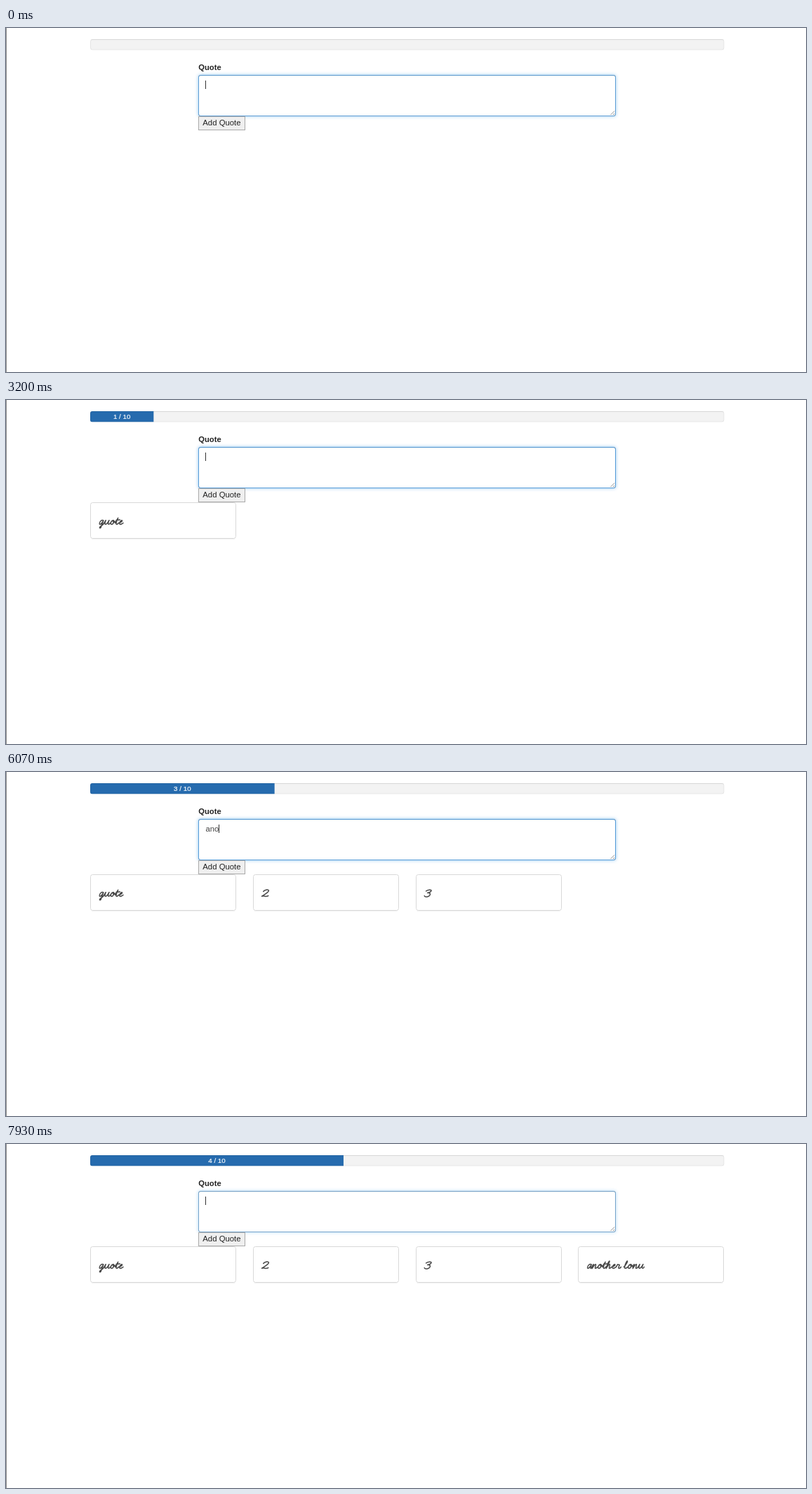
Recreate the animation shown at these times as an HTML page. Size 1140 px wide and 491 px high, loop 8000 ms.

```html
<!DOCTYPE html>
<html lang="en">
<head>
<meta charset="utf-8">
<title>Quote form</title>
<style>
  html, body { margin: 0; width: 100%; height: 100%; overflow: hidden; background: #fff; }
  svg { display: block; font-family: "Liberation Sans", Arial, sans-serif; font-size: 11.2px; fill: #222; }
  .box { fill: #fff; stroke: #b3b3b3; }
  .card rect { fill: #fff; stroke: #d9d9d9; }
  .script { fill: none; stroke: #484848; stroke-width: 1.55; stroke-linecap: round; stroke-linejoin: round; }
  .count { font-size: 9.8px; fill: #fff; stroke: #fff; stroke-width: .2; text-anchor: middle; }
</style>
</head>
<body>
<svg id="stage" width="1140" height="491" viewBox="0 0 1140 491">
  <defs>
    <filter id="blur" x="-5%" y="-40%" width="110%" height="180%"><feGaussianBlur stdDeviation="2.8"/></filter>
    <clipPath id="track"><rect x="120" y="16" width="903.5" height="15.5" rx="3"/></clipPath>
  </defs>
  <rect width="1140" height="491" fill="#fff"/>
  <path d="M.5 0V491" stroke="#8c8c8c"/>
  <g clip-path="url(#track)">
    <rect x="120" y="16" width="903.5" height="15.5" fill="#f3f3f3"/>
    <path d="M120 16.5H1024" stroke="#e4e4e4"/>
    <rect id="bar" x="120" y="16" height="15.5" fill="#266bae"/>
  </g>
  <rect x="120.5" y="16.5" width="902.5" height="14.5" rx="3" fill="none" stroke="#000" stroke-opacity=".06"/>
  <text id="count" class="count" y="27"></text>

  <text x="274.3" y="59.5" font-weight="bold">Quote</text>
  <rect id="glow" x="274" y="67" width="595" height="59" rx="3" fill="#66afe9" fill-opacity=".75" filter="url(#blur)"/>
  <rect class="box" x="274.5" y="67.5" width="594" height="58" rx="2.5"/>
  <path d="M276 68.5H867" stroke="#000" stroke-opacity=".06"/>
  <rect id="ring" x="274.5" y="67.5" width="594" height="58" rx="2.5" fill="none" stroke="#559cd8"/>
  <path d="M861.5 124L867 118.5M865 124L867 122" stroke="#777" stroke-width=".8"/>
  <text id="typed" x="284.5" y="84.5" fill="#444" xml:space="preserve"></text>
  <path id="spelling" stroke="#e0413b" stroke-width="1.5" stroke-dasharray="1.5 .9"/>
  <path id="caret" stroke="#333"/>

  <rect x="274.5" y="126.5" width="66" height="19" fill="#efefef" stroke="#a9a9a9"/>
  <text x="280.3" y="139.3" font-size="11.35">Add Quote</text>
  <g id="cards"></g>
  <g id="beam" fill="none" stroke-linecap="round">
    <path id="beamShape" stroke="#fff" stroke-width="2.6" d="M-3-6Q0-6 0-4.5V4.5Q0 6-3 6M3-6Q0-6 0-4.5M0 4.5Q0 6 3 6M-1.5 1.8H1.5"/>
    <use href="#beamShape" style="stroke:#222"/>
  </g>
  <path id="hand" fill="#fff" stroke="#111" stroke-width="1.1" stroke-linejoin="round"
    d="M-3.5-6.5C-2.3-7.4-1.3-6.3-.8-5L.3-2.5C1-3.4 2.4-3.2 2.8-2.3C3.6-3 5-2.7 5.2-1.7C6.5-2.2 8-1 8.8.8C9.8 3 9.5 5 8.6 7H2.5C1 5-1.5 3.5-3 1.5C-3.8.2-2.3-.6-1.2.3L-.6.8L-3.8-4.5C-4.2-5.4-4.1-6.1-3.5-6.5Z"/>
</svg>
<script>
const LOOP = 8000, FPS = 15, GOAL = 10, TRACK = 903.5;
const $ = id => document.getElementById(id);
const set = (el, attrs) => { for (const k in attrs) el.setAttribute(k, attrs[k]); };
const show = (el, on) => set(el, { visibility: on ? 'visible' : 'hidden' });

// Typing runs from..to; the pointer hides until `awake`; the quote is added at `add`.
const quotes = [
  { text: 'quote', from: 670, to: 1270, awake: 1730, add: 2300 },
  { text: '2', from: 3930, to: 3930, awake: 4060, add: 4500 },
  { text: '3', from: 5130, to: 5130, awake: 5270, add: 5690 },
  { text: 'another lonu', from: 5960, to: 6540, awake: 6660, add: 7393, misspelt: 8 }
];
const focusSpans = [[-90, 2150], [3070, 4370], [4730, 5600], [5830, 7280], [7880, 9000]];
const pointerPath = [
  [0, 369, 94], [1270, 369, 94], [1730, 372, 95.5], [1800, 372, 95.5], [2130, 325, 134],
  [2470, 324, 135], [2670, 324, 135], [3060, 324, 87], [4000, 324, 87], [4300, 322, 134],
  [4430, 322, 135], [4530, 320, 119], [4700, 322, 93], [5240, 322, 95], [5400, 321, 116],
  [5530, 322, 135], [5690, 322, 135], [5830, 323, 92], [6730, 324, 92], [6930, 324, 94],
  [7200, 328, 135], [7450, 328, 135], [7850, 333, 91], [8000, 333, 91]
];

// Pen strokes of the script lettering: [path, advance].
const bowl = 'M6.8-6C4.5-7.6 .8-4 1.2-1.3C1.8 .8 5-2 6.8-6';
const arch = 'L.3-.3C1.8-3.2 4.5-6.8 5.6-6C6.2-5.2 3.8-1.2 4.8-.5C5.8-.3 7.2-1.6 8-2.5';
const glyphs = {
  a: [bowl + 'C5.6-3 5-.6 6-.4C6.6-.4 7.2-1.5 7.5-2.5', 7.5],
  q: [bowl + 'L3.2 3.8C2.5 5.3 1 5 1.6 3.6C2.5 2 6 1 8-2.5', 8],
  u: ['M0-2.5L2.2-6.3C1.2-4 .2-.7 1.8-.5C3.5-.3 5.5-3.5 7-6.3C5.8-4 5-.8 6.2-.5C7.2-.4 8-1.5 8.5-2.5', 8.5],
  o: ['M4.8-6.2C2-6.5 0-2.5 1-.9C2.2 .6 5.8-2.2 5.4-5C5.2-6.8 3.5-5.6 4.2-4.2C5-3 6.2-3.8 7-4.6', 7],
  t: ['M0-2.5L4.2-9.6C2.6-6.5 .6-1.2 2-.5C3-.3 4.3-1.6 5-2.5M1.6-6.6L6.8-7.1', 5],
  e: ['M.8-2.8C3-3 5.6-4.8 5-6C4-7 1-4 1.2-1.6C1.5 .2 4.5-.5 6.5-2.5', 6.5],
  n: ['M0-2.5L2.2-6.3' + arch, 8],
  h: ['M0-2.5C2.5-4.5 6-10.5 5-11C3.8-11.3 1.5-4.5 .3-.3' + arch, 8],
  r: ['M0-2.5L2.2-6.2C3-5.2 4.4-6.2 4.8-5.6C4.8-4.4 2.6-1 3.8-.5C5-.3 6.5-1.6 7-2.5', 7],
  l: ['M0-2.5C2.5-4.5 6-10.5 5-11C3.5-11-.2-.9 1.7-.5C3-.3 4.7-1.6 5.5-2.5', 5.5],
  2: ['M3-7.5C4.5-9.6 9.5-11 10.6-8.8C11-6 3-2.5 .8-.6C3.5-2 6.5 .8 10-1.3', 11],
  3: ['M3-8C5-10 11-10.6 10.4-8.4C9.8-6.6 7-5.8 5-5.6C8-6 9.6-4.5 8.5-2.4C6.8 .6 1.5 1 .6-1.2', 11],
  ' ': ['', 4]
};

function lettering(text, x, y) {
  return [...text].map(ch => {
    const [d, advance] = glyphs[ch];
    const stroke = `<path transform="translate(${x} ${y})" d="${d}"/>`;
    x += advance;
    return d && stroke;
  }).join('');
}

$('cards').innerHTML = quotes.map(({ text }, i) => {
  const x = 120 + i * 231.8;
  return `<g class="card" role="img" aria-label="${text}">
    <path d="M${x + 2} 198.5h204" stroke="#000" stroke-opacity=".06"/>
    <rect x="${Math.round(x) + .5}" y="146.5" width="207" height="51" rx="3"/>
    <g class="script">${lettering(text, x + 12, 178)}</g></g>`;
}).join('');
const cards = [...$('cards').children];

const clamp = v => Math.min(1, Math.max(0, v));

// CSS "ease": cubic-bezier(.25, .1, .25, 1)
function ease(p) {
  p = clamp(p);
  const bezier = (s, a, b) => 3 * a * s * (1 - s) ** 2 + 3 * b * s * s * (1 - s) + s ** 3;
  let lo = 0, hi = 1;
  for (let i = 0; i < 24; i++) {
    const mid = (lo + hi) / 2;
    if (bezier(mid, .25, .25) < p) lo = mid; else hi = mid;
  }
  return bezier(lo, .1, 1);
}

function pointerAt(t) {
  const i = Math.max(1, pointerPath.findIndex(k => k[0] >= t));
  const [t0, x0, y0] = pointerPath[i - 1], [t1, x1, y1] = pointerPath[i];
  const p = clamp((t - t0) / (t1 - t0)), s = p * p * (3 - 2 * p);
  return [x0 + (x1 - x0) * s, y0 + (y1 - y0) * s];
}

function drawProgress(t) {
  const done = quotes.filter(q => t >= q.add).length;
  const width = TRACK / GOAL * quotes.reduce((sum, q) => sum + ease((t - q.add) / 600), 0);
  set($('bar'), { width });
  $('count').textContent = done ? `${done} / ${GOAL}` : '';
  set($('count'), { x: 120 + width / 2 });
  cards.forEach((card, i) => show(card, i < done));
}

function drawField(t) {
  const focused = focusSpans.some(([a, b]) => t >= a && t < b);
  const level = focusSpans.reduce((sum, [a, b]) => sum + ease((t - a) / 150) - ease((t - b) / 150), 0);
  set($('glow'), { opacity: level });
  set($('ring'), { opacity: level });

  const q = quotes.find(q => t >= q.from && t < q.add);
  const typed = $('typed');
  const share = q ? (q.to > q.from ? clamp((t - q.from) / (q.to - q.from)) : 1) : 0;
  typed.textContent = q ? q.text.slice(0, 1 + Math.floor(share * (q.text.length - 1))) : '';
  const end = 284.5 + (q ? typed.getComputedTextLength() : 0);
  set($('caret'), { d: `M${Math.floor(end) + .5} 75V87` });
  show($('caret'), focused);

  const marked = q && q.misspelt && t >= q.awake;
  show($('spelling'), marked);
  if (marked) set($('spelling'), { d: `M${284.5 + typed.getSubStringLength(0, q.misspelt)} 86.3H${end}` });
}

function drawPointer(t) {
  const [x, y] = pointerAt(t);
  const awake = !quotes.some(q => t >= q.from && t < q.awake);
  const overButton = y > 126;
  const transform = `translate(${x} ${y})`;
  set($('beam'), { transform });
  set($('hand'), { transform });
  show($('beam'), awake && !overButton);
  show($('hand'), awake && overButton);
}

function render(ms) {
  const step = Math.floor((ms % LOOP + 4) * FPS / 1000);
  const t = Math.min(step * 1000 / FPS + 4, LOOP - 1);
  drawProgress(t);
  drawField(t);
  drawPointer(t);
}

const start = performance.now();
function tick() {
  render(performance.now() - start);
  requestAnimationFrame(tick);
}
tick();
</script>
</body>
</html>
```
